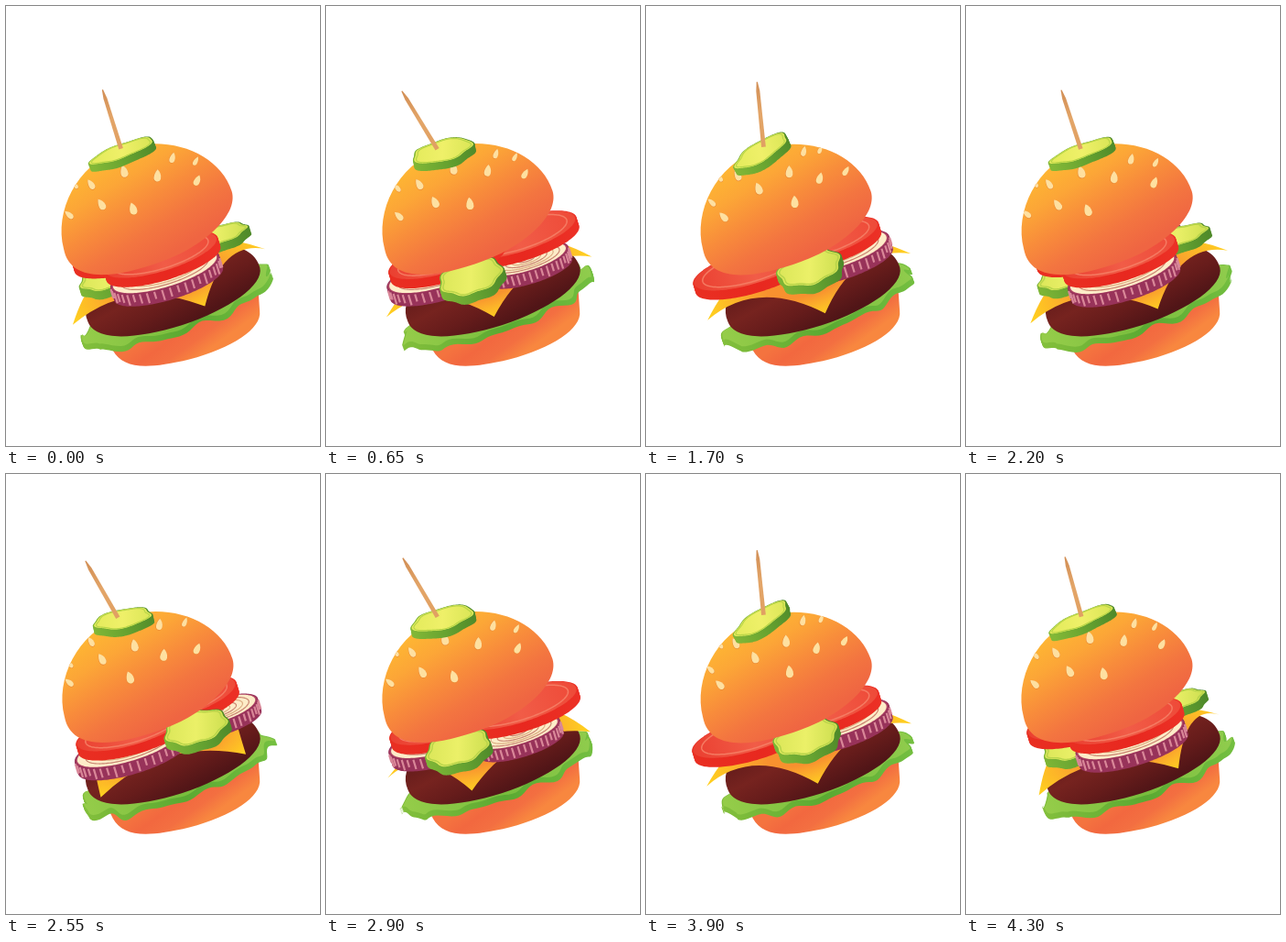
Write an HTML page with a canvas that moves like this. It is 343 px wide and 480 px high and loops after 4.35 s.

```html
<!DOCTYPE html>
<html lang="en">
<head>
<meta charset="utf-8">
<title>Spinning burger</title>
<style>
html, body { margin: 0; width: 100%; height: 100%; overflow: hidden; background: #fff; }
canvas { display: block; width: 343px; height: 480px; }
</style>
</head>
<body>
<canvas id="stage" width="343" height="480"></canvas>
<script>
const ctx = document.getElementById('stage').getContext('2d');
const LOOP = 4350, STEP = 50, TAU = Math.PI * 2, RAD = Math.PI / 180;
const TILT = -17 * RAD, FLAT = 0.28;
const { sin, cos } = Math;

function gradient(x0, y0, x1, y1, ...colors) {
  const g = ctx.createLinearGradient(x0, y0, x1, y1);
  colors.forEach((c, i) => g.addColorStop(i / (colors.length - 1), c));
  return g;
}

function fillPath(d, style) {
  ctx.fillStyle = style;
  ctx.fill(new Path2D(d));
}

// A point on a flat circle around the burger axis; angle 0 faces the viewer.
function orbit(angle, r, level) {
  return { x: -r * sin(angle), y: level + FLAT * r * cos(angle), z: cos(angle) };
}

function outline(x, y, flat, radius, lift = () => 0) {
  ctx.beginPath();
  for (let i = 0; i <= 160; i++) {
    const a = i / 160 * TAU, r = radius(a);
    ctx.lineTo(x - r * sin(a), y + flat * r * cos(a) + lift(a));
  }
  ctx.closePath();
}

// A thick slice: its rim is the outline swept downwards.
function slab(x, y, flat, h, radius, rim, face, lift) {
  ctx.fillStyle = rim;
  for (let d = h; d >= 0; d--) {
    outline(x, y + d, flat, radius, lift);
    ctx.fill();
  }
  ctx.fillStyle = face;
  outline(x, y, flat, a => radius(a) - 1.5, lift);
  ctx.fill();
}

function bottomBun() {
  fillPath('M-78 36L-75 56C-70 79-46 87 2 90C50 92 88 81 91 62L97 36Z',
    gradient(-8, 45, 8, 92, '#f4733f', '#f2683f', '#f36f41', '#f8873f'));
}

function lettuce(spin) {
  ctx.save();
  ctx.translate(6, 29);
  ctx.rotate(-3 * RAD);
  const edge = a => 109 + 3 * sin(9 * (a - spin)) + 2 * sin(14 * (a - spin) + 1);
  const ruffle = a => 2.4 * sin(11 * (a - spin)) + 1.4 * sin(17 * (a - spin) + 2);
  slab(0, 0, 0.23, 6, edge,
    gradient(-110, 0, 110, 0, '#83bf3c', '#5aa932', '#74bf40'),
    gradient(-110, 0, 110, 0, '#96cd4a', '#78bd3d', '#90cc4d'), ruffle);
  ctx.restore();
}

function patty() {
  fillPath('M-92 18C-94-10-66-25 5-27C70-28 106-11 105 17C104 36 60 51 5 52C-50 52-91 41-92 18Z',
    gradient(-6, -20, 8, 52, '#651c1b', '#76231f', '#661c1b', '#501517'));
}

function cheese(spin) {
  const at = (deg, r, level) => orbit(spin + (deg - 15.5) * RAD, r, level);
  ctx.save();
  ctx.translate(4, 0);
  ctx.beginPath();
  for (let i = 0; i < 4; i++) {
    const p = at(i * 90, 117, 8), q = at(i * 90 + 45, 80, -35), n = at(i * 90 + 90, 117, 8);
    if (!i) ctx.moveTo(p.x, p.y);
    ctx.quadraticCurveTo(q.x, q.y, n.x, n.y);
  }
  ctx.closePath();
  ctx.scale(1, 0.37);
  const g = ctx.createRadialGradient(0, 0, 45, 0, 0, 112);
  g.addColorStop(0, '#f8912f');
  g.addColorStop(0.5, '#fcb12a');
  g.addColorStop(1, '#ffce20');
  ctx.fillStyle = g;
  ctx.fill();
  ctx.restore();
}

function onion({ x, y }, r, spin) {
  const h = 14, count = 44;
  slab(x, y, FLAT, h, () => r, '#98335a', '#b04666');
  ctx.lineWidth = 2.2;
  ctx.strokeStyle = '#d98798';
  for (let i = 0; i < count; i++) {
    const a = spin + i / count * TAU;
    if (cos(a) < 0) continue;
    const px = x - r * sin(a), py = y + FLAT * r * cos(a);
    ctx.beginPath();
    ctx.moveTo(px, py + 1);
    ctx.lineTo(px, py + h - 3 + 2 * sin(i * 2.3));
    ctx.stroke();
  }
  ctx.fillStyle = '#fdecc8';
  outline(x, y, FLAT, () => r - 3);
  ctx.fill();
  ctx.lineWidth = 1.2;
  for (let k = 1; k < 6; k++) {
    ctx.strokeStyle = k % 2 ? '#c98470' : '#dcae83';
    outline(x, y, FLAT, () => (r - 3) * (1 - k * 0.16));
    ctx.stroke();
  }
}

function tomato({ x, y }, r) {
  slab(x, y, FLAT, 10, () => r,
    gradient(x - r, 0, x + r, 0, '#e92f22', '#e8281f', '#ec3126'),
    gradient(x - r, 0, x + r, 0, '#ea3f30', '#f15c47', '#ee4a38'));
  ctx.lineWidth = 1.5;
  ctx.strokeStyle = '#f57b62';
  outline(x, y, FLAT, () => r - 11);
  ctx.stroke();
}

function pickle({ x, y, z }, angle) {
  const flat = FLAT + 0.26 * Math.max(0, z);
  const edge = a => 36 + 1.8 * sin(7 * (a - angle));
  slab(x, y, flat, 9, edge,
    gradient(x - 35, 0, x + 35, 0, '#7db536', '#65a231', '#4f8a2a'),
    gradient(x - 30, y - 10, x + 30, y + 10, '#dce75a', '#ebf068', '#cfe052'));
  ctx.lineWidth = 1.5;
  ctx.strokeStyle = '#b9d54a';
  outline(x, y, flat, a => edge(a) - 4);
  ctx.stroke();
}

const BUN = 'M-94-65C-92-108-54-148-5-151C52-153 99-116 100-72C100-44 50-23 5-21C-50-18-98-27-94-65Z';
// angle, radius, height; the pattern repeats three times around the bun
const SEEDS = [[-53, 84, -108], [6, 84, -108], [34, 72, -116],
  [-26, 62, -127], [8, 45, -139], [56, 54, -132]];

function topBun(spin) {
  fillPath(BUN, gradient(-24, -148, 8, -24, '#feb733', '#fca637', '#f88c3b', '#f37540', '#ef6542'));
  ctx.save();
  ctx.clip(new Path2D(BUN));
  for (let turn = 0; turn < 3; turn++) {
    for (const [deg, r, level] of SEEDS) {
      const p = orbit(spin + (deg + turn * 120) * RAD, r, level);
      if (p.z < -0.3) continue;
      ctx.save();
      ctx.translate(p.x, p.y);
      ctx.rotate(12 * RAD + p.x * 0.009);
      ctx.scale(0.55 + 0.45 * Math.max(0, p.z), 0.8 + 0.25 * p.z);
      fillPath('M-1.5-7C-3.5-4-4.6-1-4.4 2C-4 8 4 8 4.4 2C4.4-2 1.5-5-1.5-7Z', '#e98a36');
      fillPath('M-1-7C-3-4-4-1-3.8 2C-3.4 7 4 7 4.3 2C4.3-2 2-5-1-7Z', '#fee0a0');
      ctx.restore();
    }
  }
  ctx.restore();
}

function topPickle(spin) {
  const flat = 0.31 - 0.07 * cos(spin);
  ctx.save();
  ctx.translate(-2, -149);
  ctx.rotate((-3 + 9 * sin(spin - 10 * RAD)) * RAD);
  const edge = a => {
    const b = a - spin;
    return 35 + 3 * cos(2 * b + 2.6) + 1.8 * sin(5 * b);
  };
  slab(0, 0, flat, 8, edge,
    gradient(-36, 0, 36, 0, '#83b837', '#67a330', '#4f8a2a'),
    gradient(-30, -8, 30, 8, '#e4eb5c', '#eff069', '#dbe657'));
  ctx.lineWidth = 1.2;
  ctx.strokeStyle = '#b9d647';
  outline(0, 0, flat, a => edge(a) - 4);
  ctx.stroke();
  ctx.restore();
}

function pick(spin) {
  const dx = 3.4 * cos(spin) - 19 * sin(spin), dy = 3.2 * cos(spin) + 6 * sin(spin);
  const bx = 125 + dx * 0.18, by = 155 + dy * 0.25;
  const vx = 102 + dx - bx, vy = 88 + dy - by, len = Math.hypot(vx, vy);
  ctx.save();
  ctx.translate(bx, by);
  ctx.rotate(Math.atan2(vx, -vy));
  ctx.fillStyle = gradient(0, -len, 0, 0, '#d18e55', '#e3a568', '#e0a062');
  ctx.beginPath();
  ctx.moveTo(-2.4, 0);
  ctx.lineTo(-2, 10 - len);
  ctx.lineTo(-0.6, -len);
  ctx.lineTo(0.6, -len);
  ctx.lineTo(2, 10 - len);
  ctx.lineTo(2.4, 0);
  ctx.fill();
  ctx.restore();
}

function draw(time) {
  const spin = time / LOOP * 2 * TAU;
  const place = (deg, r, level) => orbit(spin + deg * RAD, r, level);
  const paint = list => list.sort((a, b) => a.p.z - b.p.z).forEach(o => o.show(o.p));
  const onionAt = (deg, r, size) =>
    ({ p: place(deg, r, -21), show: p => onion(p, size, spin) });
  const pickleAt = (deg, r) =>
    ({ p: place(deg, r, -28), show: p => pickle(p, spin + deg * RAD) });
  const tomatoAt = (deg, r, level, size) =>
    ({ p: place(deg, r, level), show: p => tomato(p, size) });

  ctx.fillStyle = '#fff';
  ctx.fillRect(0, 0, 343, 480);
  ctx.save();
  ctx.translate(172, 300);
  ctx.rotate(TILT);
  bottomBun();
  lettuce(spin);
  patty();
  cheese(spin);

  const pickles = [pickleAt(-98, 70), pickleAt(68, 57)];
  const inFront = o => o.p.z > 0.6;
  paint([onionAt(-6, 42, 62), onionAt(202, 67, 48), ...pickles.filter(o => !inFront(o))]);
  paint([tomatoAt(154, 50, -35, 68), tomatoAt(-10, 32, -37, 65)]);
  paint(pickles.filter(inFront));

  ctx.translate(sin(spin), 0);
  topBun(spin);
  topPickle(spin);
  ctx.restore();
  pick(spin);
}

let start;
function tick(now) {
  if (start === undefined) start = now;
  const t = (now - start) % LOOP;
  draw(Math.floor(t / STEP) * STEP);
  requestAnimationFrame(tick);
}
draw(0);
requestAnimationFrame(tick);
</script>
</body>
</html>
```
